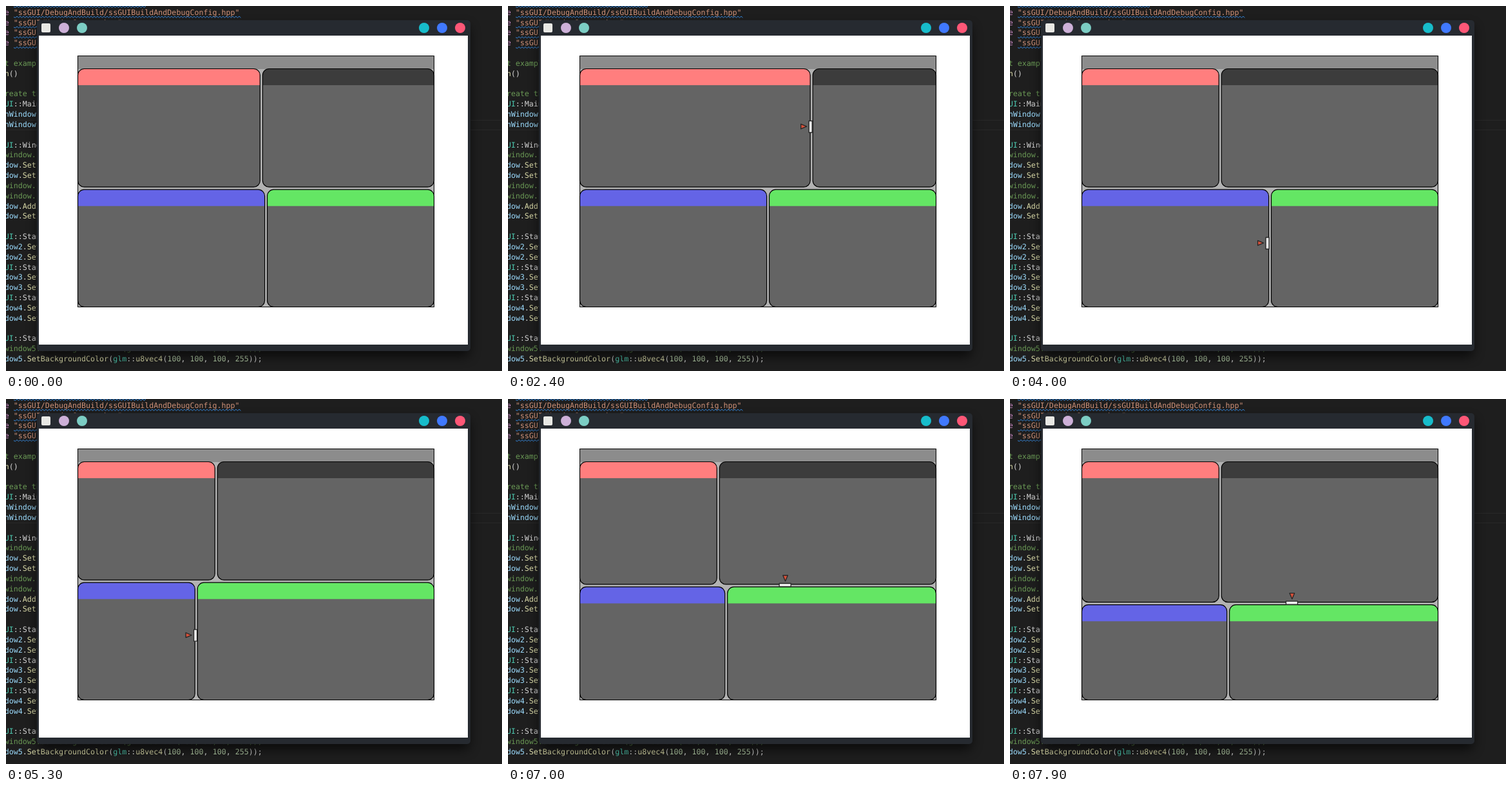
Write an HTML page that moves like this. It is 770 px wide and 567 px high and loops after 8 s.

```html
<!DOCTYPE html>
<html lang="en">
<head>
<meta charset="utf-8">
<title>Docked windows</title>
<style>
html, body { margin: 0; width: 100%; height: 100%; overflow: hidden; background: #1e1e1e; }
svg { display: block; width: 770px; height: 567px; }
text { font: 11.667px "DejaVu Sans Mono", monospace; white-space: pre; text-rendering: geometricPrecision; }
</style>
</head>
<body>
<svg viewBox="0 0 770 567">
  <defs>
    <filter id="soft" x="-10%" y="-10%" width="120%" height="120%"><feGaussianBlur stdDeviation="9"/></filter>
  </defs>
  <rect width="770" height="567" fill="#1e1e1e"/>
  <path d="M0 177.5H770M0 192.5H770" stroke="#282828"/>
  <g id="code"></g>
  <rect x="50" y="32" width="669" height="512" rx="5" filter="url(#soft)" opacity=".65"/>
  <rect x="48" y="22" width="673" height="514" rx="5" fill="#262a30"/>
  <rect x="51" y="46" width="666" height="480" fill="#fff"/>
  <rect x="55" y="27" width="14" height="14" rx="2" fill="#e8e8e4"/>
  <g id="buttons"></g>
  <rect x="111" y="77" width="554" height="391" fill="#b2b2b2"/>
  <rect x="111" y="77" width="554" height="21" fill="#8c8c8c"/>
  <g id="panes"></g>
  <rect x="111.5" y="77.5" width="553" height="390" fill="none" stroke="#000"/>
  <g id="arrow" stroke-linejoin="round">
    <path d="M1 1L15 13.2Q10 19.5 1.2 21Z" fill="#ece9e5"/>
    <path d="M15 13.2Q10 19.5 1.2 21V17Q8 16.4 11.6 10.5Z" fill="#d0493a"/>
    <path d="M1 1L15 13.2Q10 19.5 1.2 21Z" fill="none" stroke="#2c2c2c" stroke-width="1.8"/>
  </g>
  <g id="resize" stroke="#262626" stroke-width="1.3" stroke-linejoin="round">
    <rect x="-2.5" y="-9" width="5" height="18" fill="#f4f4f4"/>
    <path d="M-15 -4.2L-6 -.4L-15 3.4Z" fill="#d8513a"/>
  </g>
</svg>
<script>
const NS = "http://www.w3.org/2000/svg";
const $ = id => document.getElementById(id);
function add(parent, tag, attrs) {
  const el = document.createElementNS(NS, tag);
  for (const k in attrs) el.setAttribute(k, attrs[k]);
  parent.appendChild(el);
  return el;
}

// Editor behind the window; a leading # marks a comment line
const LEFT = -2.3, CHAR = 7.024, ROW = 15.83;
const COMMENT = "#6a9955";
const code = `e "ssGUI/Extensions/Layout.hpp"
e "ssGUI/DebugAndBuild/ssGUIBuildAndDebugConfig.hpp"
e "ssGUI/HeaderGroups.hpp"
e "ssGUI/HeaderGroups.hpp"
e "ssGUI/HeaderGroups.hpp"

#t example
n()

#reate the
UI::Main
nWindow
nWindow

UI::Window
#window.
dow.Set
dow.Set
#window.
#window.
dow.Add
dow.Set

UI::Stand
dow2.Set
dow2.Set
UI::Stand
dow3.Set
dow3.Set
UI::Stand
dow4.Set
dow4.Set

UI::Stand
#window5.SetBackgroundColor(glm::u8vec4(255, 50, 0, 255));
dow5.SetBackgroundColor(glm::u8vec4(100, 100, 100, 255));`;

// One group per kind: string, scope, function, number, keyword, variable, plain
const TOKEN = /("[^"]*")|(\w+(?=::))|((?<=\.)\w+|\w+(?=\())|(\b\d+\b)|(^e\b)|((?<!:)\b[a-z]\w*)|([^\w"]+|\w+)/gi;
const TOKEN_COLORS = ["#ce9178", "#4ec9b0", "#dcdcaa", "#b5cea8", "#c586c0", "#9cdcfe", "#d4d4d4"];

function squiggle(y, from, to) {
  let d = `M${from} ${y}`;
  for (let x = from, side = 1.1; x < to; side = -side) d += `L${x += 2.5} ${y + side}`;
  add($("code"), "path", { d, fill: "none", stroke: "#3487dc", "stroke-width": 1 });
}

code.split("\n").forEach((src, i) => {
  const y = 13.8 + (i - 1) * ROW;
  const el = add($("code"), "text", { x: LEFT, y });
  if (src[0] === "#") {
    el.setAttribute("fill", COMMENT);
    el.textContent = src.slice(1);
    return;
  }
  for (const [text, ...groups] of src.matchAll(TOKEN))
    add(el, "tspan", { fill: TOKEN_COLORS[groups.findIndex(Boolean)] }).textContent = text;
  if (src.includes('"')) squiggle(y + 3.3, 12, LEFT + src.length * CHAR);
});

["#cdb0d8", "#7ccdc4", "#17bccb", "#4079ff", "#fe5777"].forEach((fill, i) =>
  add($("buttons"), "circle", { cx: (i < 2 ? 90 : 593) + i * 28, cy: 34, r: 8, fill }));

// Docked panes
const R = 10, HEAD = 25.5, GAP = 2;
const L = 111.5, T = 97.5, RIGHT = 664.5, BOTTOM = 467.5;
const panes = ["#ff7e7e", "#3c3c3c", "#6464e6", "#64e664"].map(fill => ({
  body: add($("panes"), "rect", { rx: R, fill: "#646464" }),
  head: add($("panes"), "path", { fill }),
  edge: add($("panes"), "rect", { rx: R, fill: "none", stroke: "#000", "stroke-width": 1.2 })
}));
function place(pane, x0, y0, x1, y1) {
  for (const el of [pane.body, pane.edge]) {
    el.setAttribute("x", x0);
    el.setAttribute("y", y0);
    el.setAttribute("width", x1 - x0);
    el.setAttribute("height", y1 - y0);
  }
  pane.head.setAttribute("d",
    `M${x0} ${y0 + HEAD}V${y0 + R}a${R} ${R} 0 0 1 ${R} ${-R}H${x1 - R}a${R} ${R} 0 0 1 ${R} ${R}V${y0 + HEAD}Z`);
}

// Eased swing between turning points [time, ...values]
function swing(keys, t) {
  const next = keys.findIndex(k => k[0] > t);
  if (next < 1) return keys.at(next).slice(1);
  const a = keys[next - 1], b = keys[next];
  const u = (1 - Math.cos(Math.PI * (t - a[0]) / (b[0] - a[0]))) / 2;
  return a.slice(1).map((v, i) => v + (b[i + 1] - v) * u);
}

const dividers = {
  top: [[1500, 396.4], [2050, 250], [2400, 471.2], [2500, 471.2], [3000, 326.3]],
  low: [[4800, 403.6], [5200, 266], [5600, 466], [6000, 338.7]],
  mid: [[6900, 283.2], [7200, 310], [7600, 204], [7920, 318.8]]
};
const split = (name, t) => swing(dividers[name], t)[0];

// The pointer's own path; while it holds a divider, that divider sets one axis
const path = [[300, 713, 296], [1000, 400, 194], [1500, 400, 193.5], [1900, 400, 200], [2400, 400, 187.5],
  [3000, 325, 198], [3400, 425, 343], [4000, 400, 368.5], [4800, 400, 368.5], [6000, 337, 365],
  [6200, 427, 304], [6350, 446, 288], [6600, 432, 282], [6900, 431, 282], [7400, 422, 282], [7900, 437.5, 282]];
const grabs = [
  { name: "top", from: 1200, to: 3000, offset: 1.5 },
  { name: "low", from: 4000, to: 6000, offset: 4 },
  { name: "mid", from: 6600, to: 8000, offset: 1.5, down: true }
];
const LAG = 5; // ms a divider trails the pointer

function draw(t) {
  const a = split("top", t), b = split("low", t), m = split("mid", t);
  place(panes[0], L, T, a - GAP, m - GAP);
  place(panes[1], a + GAP, T, RIGHT, m - GAP);
  place(panes[2], L, m + GAP, b - GAP, BOTTOM);
  place(panes[3], b + GAP, m + GAP, RIGHT, BOTTOM);

  const grab = grabs.find(g => t >= g.from && t <= g.to);
  const shown = t >= path[0][0];
  $("arrow").style.display = shown && !grab ? "" : "none";
  $("resize").style.display = grab ? "" : "none";
  const pos = swing(path, t);
  if (grab) pos[grab.down ? 1 : 0] = split(grab.name, t + LAG) - grab.offset;
  $(grab ? "resize" : "arrow").setAttribute("transform",
    `translate(${pos})` + (grab && grab.down ? " rotate(90)" : ""));
}

const LOOP = 8000, STEP = 100;
const start = performance.now();
function tick() {
  const t = (performance.now() - start) % LOOP;
  draw(Math.floor(t / STEP) * STEP);
  requestAnimationFrame(tick);
}
tick();
</script>
</body>
</html>
```
